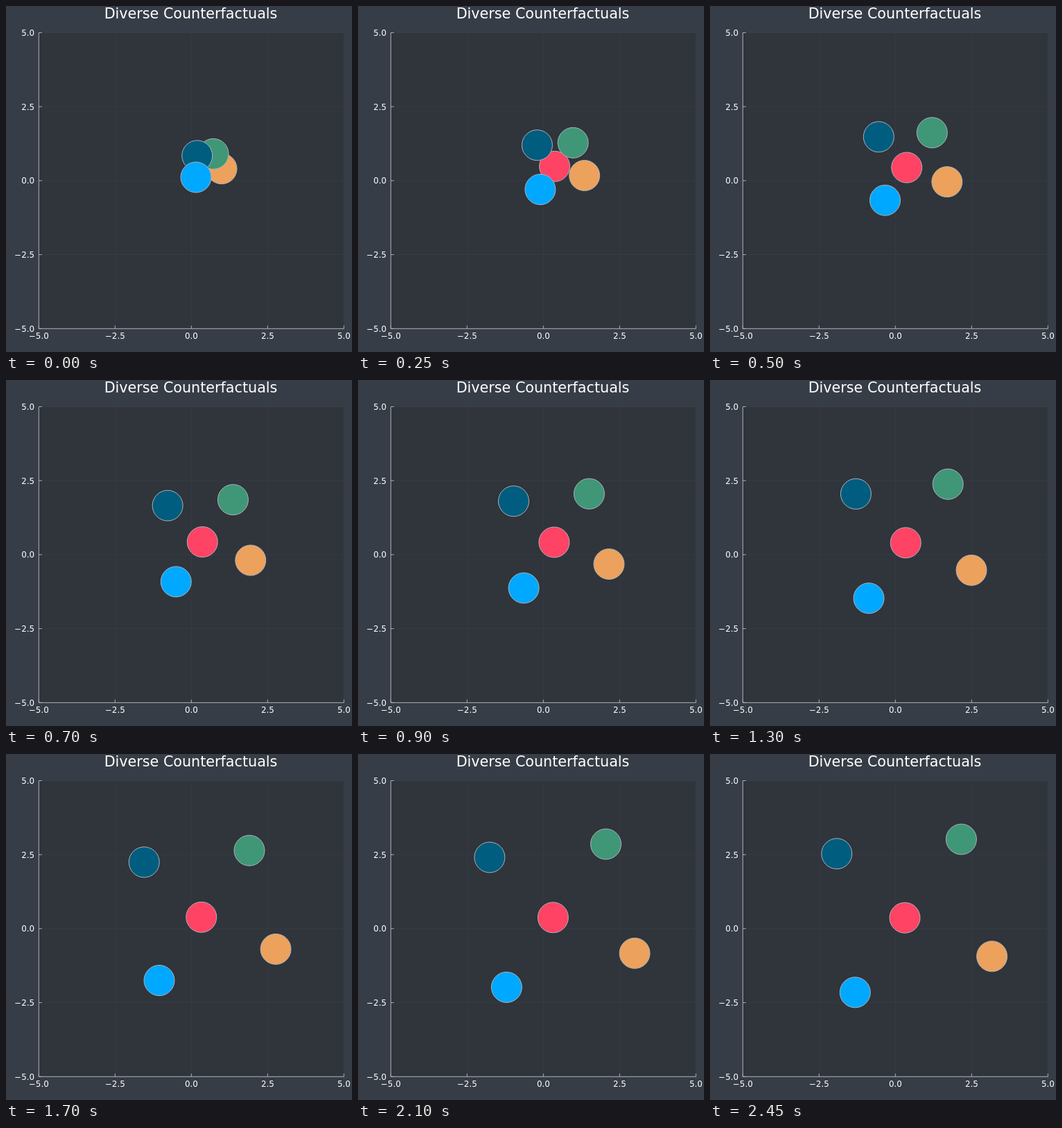
Write an HTML page with a canvas that moves like this. It is 499 px wide and 499 px high and loops after 2.5 s.

```html
<!DOCTYPE html>
<html lang="en">
<head>
<meta charset="utf-8">
<title>Diverse Counterfactuals</title>
<style>
  html, body { margin: 0; height: 100%; overflow: hidden; background: #363d46; }
  canvas { display: block; }
</style>
</head>
<body>
<canvas id="stage" width="499" height="499"></canvas>
<script>
const ctx = document.getElementById('stage').getContext('2d');
const STEP_MS = 50, STEPS = 50, BURST_STEPS = 10, RADIUS = 22;
const LEFT = 47.3, RIGHT = 487.3, TOP = 38.5, BOTTOM = 465.3;

// Listed from back to front: where each disc starts, where the burst leaves it, where it ends.
const discs = [
  { color: '#fe4365', start: [281.8, 227.6], apart: [283.7, 233], end: [281, 236.2] },
  { color: '#eca25c', start: [311, 234.7], apart: [341.8, 253.6], end: [406.6, 291.8] },
  { color: '#3f9778', start: [299, 213.3], apart: [320.3, 182.7], end: [362.4, 123] },
  { color: '#005d7f', start: [275.7, 215.9], apart: [243.3, 188.7], end: [182.8, 143.8] },
  { color: '#00a8ff', start: [274, 247], apart: [252.5, 280.2], end: [209.3, 343.8] }
];

// A short burst eases smoothly into a logarithmic drift; t = 1 where they meet.
const drift = t => Math.log((1 + t) / 2);
const DRIFT_END = drift((STEPS - 1) / BURST_STEPS);

function position({ start, apart, end }, t) {
  return apart.map((middle, axis) => {
    const rate = (end[axis] - middle) / DRIFT_END;
    if (t > 1) return middle + rate * drift(t);
    const speed = rate / 2;
    return middle + speed * (t - 1) + (start[axis] - middle + speed) * (1 - t) ** 2;
  });
}

function line(x1, y1, x2, y2) {
  ctx.beginPath();
  ctx.moveTo(x1, y1);
  ctx.lineTo(x2, y2);
  ctx.stroke();
}

function text(label, x, y, size, align) {
  ctx.font = `${size}px "DejaVu Sans", sans-serif`;
  ctx.textAlign = align;
  ctx.fillText(label, x, y);
}

function drawPlot() {
  ctx.fillStyle = '#363d46';
  ctx.fillRect(0, 0, 499, 499);
  ctx.fillStyle = '#30343b';
  ctx.fillRect(LEFT, TOP, RIGHT - LEFT, BOTTOM - TOP);

  ctx.fillStyle = '#fff';
  ctx.strokeStyle = '#adb2b7';
  text('Diverse Counterfactuals', 266.5, 18.3, 20.7, 'center');
  for (let i = 0; i <= 4; i++) {
    const value = -5 + 2.5 * i;
    const label = value.toFixed(1).replace('-', '−');
    const x = LEFT + (RIGHT - LEFT) * i / 4;
    const y = BOTTOM - (BOTTOM - TOP) * i / 4;
    ctx.globalAlpha = 0.05;
    line(x, TOP, x, BOTTOM);
    line(LEFT, y, RIGHT, y);
    ctx.globalAlpha = 1;
    line(x, BOTTOM, x, BOTTOM - 4.4);
    line(LEFT, y, LEFT + 4.4, y);
    text(label, x, 480.4, 11.85, 'center');
    text(label, 41.1, y + 4.3, 11.85, 'right');
  }
  line(LEFT, TOP, LEFT, BOTTOM);
  line(LEFT, BOTTOM, RIGHT, BOTTOM);
}

function draw() {
  const step = Math.floor(performance.now() / STEP_MS) % STEPS;
  drawPlot();
  for (const disc of discs) {
    const [x, y] = position(disc, step / BURST_STEPS);
    ctx.beginPath();
    ctx.arc(x, y, RADIUS, 0, 2 * Math.PI);
    ctx.fillStyle = disc.color;
    ctx.fill();
    ctx.stroke();
  }
  requestAnimationFrame(draw);
}
draw();
</script>
</body>
</html>
```
